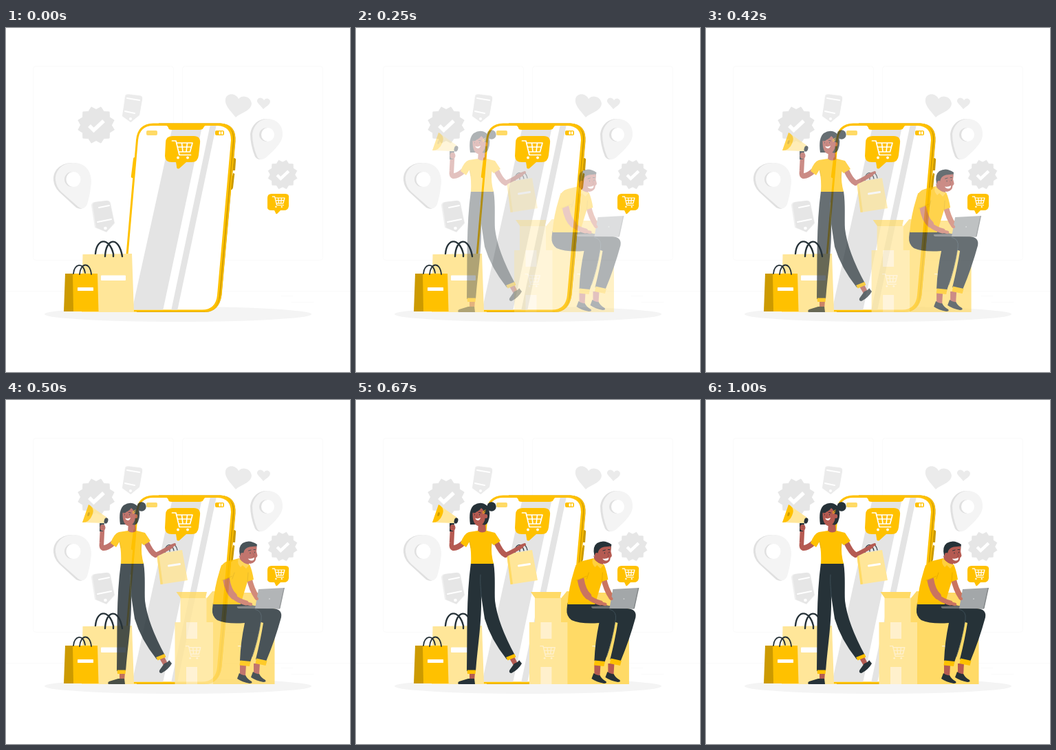
An HTML page with a canvas for the animation above (1040 ms loop, 500x500 px).

```html
<!DOCTYPE html>
<html lang="en">
<head>
<meta charset="utf-8">
<title>Online shopping</title>
<style>
html, body { margin: 0; width: 100%; height: 100%; overflow: hidden; background: #fff; }
canvas { display: block; width: 500px; height: 500px; }
</style>
</head>
<body>
<canvas id="stage" width="500" height="500"></canvas>
<script>
const SIZE = 500, LOOP = 1040, STEP = 1000 / 24, TRAVEL = 30;
const YELLOW = '#ffc100', DEEP = '#cc9a00', PALE = '#ffe699', MID = '#ffda66', TAPE = '#fff0cc';
const DARK = '#263238', SKIN = '#b55b52', TAN = '#ca7460', SHADE = '#9c453f';
const GREY = '#e6e6e6', SILVER = '#ebebeb', MIST = '#f4f4f4';

const stage = document.getElementById('stage').getContext('2d');
const newLayer = () => {
  const c = document.createElement('canvas');
  c.width = c.height = SIZE;
  return c.getContext('2d');
};
let g;

const fill = (color, d) => { g.fillStyle = color; g.fill(new Path2D(d)); };
const line = (color, width, d) => {
  g.strokeStyle = color;
  g.lineWidth = width;
  g.lineCap = g.lineJoin = 'round';
  g.stroke(new Path2D(d));
};
const oval = (color, x, y, rx, ry = rx, turn = 0) => {
  g.fillStyle = color;
  g.beginPath();
  g.ellipse(x, y, rx, ry, turn, 0, Math.PI * 2);
  g.fill();
};
const box = (color, x, y, w, h, r = 0) => {
  g.fillStyle = color;
  g.beginPath();
  g.roundRect(x, y, w, h, r);
  g.fill();
};

// Cart icon, about 30 units wide, centred on x, y
function cart(x, y, scale, color, width = 1.7) {
  g.save();
  g.translate(x, y);
  g.scale(scale, scale);
  line(color, width, 'M-14.5 -13H-9L-4 7.5H12.5M-7.5 -10H15L11.5 3H-5M-6.5 -4H13.5M-.5 -10L1 3M7.5 -10L6 3');
  oval(color, -6, 11.5, 1.9);
  oval(color, 8, 11.5, 1.9);
  g.restore();
}

function badge(x, y, r) {
  g.save();
  g.translate(x, y);
  g.scale(r / 27, r / 27);
  g.beginPath();
  for (let i = 0; i < 24; i++) {
    const a = (i + 1) * Math.PI / 12, d = i % 2 ? 22.5 : 27;
    g.lineTo(Math.cos(a) * d, Math.sin(a) * d);
  }
  g.closePath();
  g.fillStyle = g.strokeStyle = GREY;
  g.lineWidth = 1;
  g.lineJoin = 'round';
  g.fill();
  g.stroke();
  g.strokeStyle = '#fff';
  g.lineWidth = 5.5;
  g.lineCap = 'butt';
  g.lineJoin = 'miter';
  g.stroke(new Path2D('M-10 1L-3.5 7.5L11 -6'));
  g.restore();
}

function scenery() {
  g.strokeStyle = '#fafafa';
  g.lineWidth = 1;
  for (const x of [39.5, 256.5]) {
    g.beginPath();
    g.roundRect(x, 55.5, 204, 282, 4);
    g.stroke();
  }
  line('#fafafa', 1, 'M0 382.5H500M400 389.5H417M415 398.5H447');
  oval('#f4f4f4', 250, 416, 194, 11);

  badge(131, 141, 27);
  badge(402, 213, 21.5);

  fill('#f2f2f2', 'M173 98Q174 96 178 96L194 98Q199 99 198 104L194 127L181 137L169 128Z');
  fill(SILVER, 'M174 98Q175 97 179 97L195 98.5Q199 99 198 104L194 126L181.5 137L169 128Z');
  line('#fff', 2, 'M176 102L194 105M173 121L187 124');
  oval('#fff', 181, 132, 2);
  fill('#f0f0f0', 'M124 258Q124 254 128 253L145 251Q150 250 152 254L158 284L146 297L129 290Z');
  fill(GREY, 'M126 258Q126 254 130 253L146 251Q150 251 151 254L157.5 283L146 296.5L131 290Z');
  line('#fff', 2, 'M135 261L150 258M133 282L153 278');
  oval('#fff', 144.5, 291, 2.3);

  fill('#e0e0e0', 'M69 221C68 207 79 197 94 196C110 195 121 206 121 223L116 257Q111 266 102 261L77 238Q70 231 69 221Z');
  fill(MIST, 'M72 221C71 207 82 196 97 196C113 195 124 206 124 223C123 236 121 246 118 256Q113 266 105 260L80 238Q73 231 72 221Z');
  oval('#e0e0e0', 96, 220, 11);
  oval('#fff', 98, 220, 10.5, 11);
  fill('#e0e0e0', 'M355 154C357 140 367 132 379 132C392 133 401 143 400 156C399 166 392 172 387 178L375 189Q367 194 362 187Q355 170 355 154Z');
  fill(MIST, 'M358 154C360 140 370 132 381 132C395 133 403 143 402 156C401 166 394 172 389 178L377 189Q369 194 365 187Q358 170 358 154Z');
  oval('#e0e0e0', 378, 155, 10);
  oval('#fff', 380.5, 155, 9.5, 10);

  fill(SILVER, 'M334 130C328 122 317 113 319 103C321 94 334 94 338 103C344 96 356 100 357 110C356 121 341 123 334 130Z');
  fill(SILVER, 'M374 118C371 113 364 109 365 105C367 100 373 101 375 105C378 100 384 103 384 107C383 113 377 114 374 118Z');
}

function phone() {
  fill(DEEP, 'M331 189Q335 189 334 193L333 207H329ZM330 211Q333 211 332 214L330 232Q329 236 325 235Z');
  fill(YELLOW, 'M187 188H190L187 218H184Q181 218 182 214L185 190Q185 188 187 188Z');
  fill(DEEP, 'M222 138.5H312Q335 140 333.5 165L313.5 388Q310 412 290 413H190V409Z');
  line(YELLOW, 1.6, 'M310 139.3Q334 140 332.3 165L312.5 388Q309 411 290 412');
  fill(YELLOW, 'M214 138.5H308Q331 139 330 163L310 389Q308 412.5 286 412.5H181Q168 412 169 393L189 163Q191 139 214 138.5Z');
  const screen = 'M214 142H308Q327 143 327 163L307 388Q305 409.5 285 409.5H183Q171 409 172 393L192 163Q194 142 214 142Z';
  fill('#fff', screen);
  g.save();
  g.clip(new Path2D(screen));
  fill('#e4e4e4', 'M183 411L241 148H284L228 411ZM240 411L297 140H306L249 411Z');
  g.restore();
  fill(YELLOW, 'M231 141H292Q288 142 287 145Q286 148 281 148H241Q236 148 236 145Q235 142 231 141Z');
  box(MID, 204, 149, 16, 7, 2);
  box(YELLOW, 304, 149, 13, 7, 2);
  box('#fff', 309.5, 150.3, 2.4, 4.4);
  box('#fff', 313, 150.3, 2.4, 4.4);

  fill(YELLOW, 'M242 157H273Q283 157 282 167L280 185Q279 195 270 195H262L252 204Q248 206 248 201L247 195H241Q231 195 231 186L232 167Q232 157 242 157Z');
  cart(256, 177, 1, '#fff');
  fill(YELLOW, 'M386 241H406Q412 241 411 247L411 259Q410 265 404 265H399L394 270Q392 271 392 269L390 265H386Q379 265 380 259V247Q380 241 386 241Z');
  cart(396, 253, 0.6, '#fff', 2);
}

function bags() {
  fill(PALE, 'M111.5 329L183 328L186 413H110Z');
  line(DARK, 2.4, 'M130 328C132 305 150 304 156 328L156 332M144 332C145 305 164 302 169 332');
  box('#fff', 138, 359.5, 36, 7.5, 1);
  fill(DEEP, 'M86 357H98L99 412H84Z');
  fill(YELLOW, 'M97 357H133L134.5 412H98Z');
  line(DARK, 1.8, 'M98 357C99 342 113 340 115 356M107 358C108 341 122 339 124 358');
  box('#fff', 104, 377, 23, 5, 0.5);
}

function woman() {
  // Carried bag
  line(DARK, 1.2, 'M231 222C230 210 241 205 244 219M238 220C237 207 247 207 249 218');
  fill(PALE, 'M219 224L256 218L264 262L225 268Z');
  fill(MID, 'M219 224L222 223.5L228 267.5L224.5 268Z');
  line('#fff', 3, 'M236.5 241L252.5 238.5');

  // Legs and shoes
  fill(SKIN, 'M165 396H173L172 408H165ZM222 374L229 371L235 383L229 386Z');
  fill(DARK, 'M172 405L173 413H149Q147 411 150 409L163 405ZM230 383Q236 381 237 378L241 383Q236 392 226 397Q222 397 223 393Z');
  fill(DARK, 'M167 237H200C203 257 201 278 202 292Q206 325 231 371L219 377Q196 348 187 318L182 285C183 322 177 355 174 394H161C162 341 160 287 167 237Z');
  line('#455a64', 0.7, 'M181 254C180 268 182 275 182 287');
  fill(YELLOW, 'M161.5 392.5H174L173.5 398H162ZM218 374L230.5 369L232.5 373.5L220.5 378.5Z');

  // Megaphone and raised arm
  line(SKIN, 8, 'M157 207Q148 215 142 215');
  line(SKIN, 6.5, 'M142 215Q138 216 139 208L140 188');
  fill(PALE, 'M120 152L147 171L144 179L111 178Z');
  fill(YELLOW, 'M120 152Q130 157 125 168Q121 178 111 178Z');
  oval(DEEP, 120, 166, 1.5, 3, 0.35);
  oval(DARK, 145.5, 175.5, 2.8, 4.2, 0.3);
  fill(DARK, 'M136 179H143L141 191H136Z');
  oval(SKIN, 140.5, 185.5, 4, 4.5);
  line(SHADE, 0.6, 'M138 184H143M138 187H143');

  // Other arm
  line(SKIN, 8, 'M204 207Q211 222 217 225');
  line(SKIN, 6, 'M217 225Q227 221 240 213');
  line(SKIN, 4, 'M237 214L245 210');

  // Shirt
  fill(SKIN, 'M178 178H188L189 193Q183 199 177 192Z');
  fill(YELLOW, 'M177 190Q183 195 190 190L202 193L210 205L200 211L197 208Q196 224 200 238H167Q168 221 165 206L160 214L152 208Q157 194 164 192Z');
  line('#e0a900', 0.8, 'M165 206L167 215M197 208L196 218');

  // Head
  oval(DARK, 197, 155, 6.7);
  fill(DARK, 'M166 181Q163 160 171 153Q182 146 191 154Q197 164 192 177Q189 183 184 181Z');
  fill(SKIN, 'M169.5 164Q178 163 182 157Q188 161 188 170Q187 181 179 183.5Q169 182 169.5 164Z');
  oval(SKIN, 189, 169, 2.2, 3);
  fill('#fff', 'M173 171.5Q177 173.5 181 171Q180 175 177 175Q174 174.5 173 171.5Z');
  line(DARK, 1, 'M172.5 166.5V167M179.5 166.5V167M171 164L173.5 163.5M178.5 163.5L181.5 164');
  line(SHADE, 0.8, 'M176 166.5L174.5 170H176.5');
  line(YELLOW, 1, 'M184 163L188 160M184.5 165L188 162.5');
}

function crates() {
  fill(MID, 'M306 280H396.5V413H304ZM297 289L306 278H314V323H297Z');
  fill(PALE, 'M259.5 287H297.5V323H259.5Z');
  fill(MID, 'M253.5 279H298L296 288H260Z');
  fill(PALE, 'M251.5 323H307V413H251.5Z');
  fill(TAPE, 'M268 323H284V347H268ZM268 388H284V413H268Z');
  cart(278, 367, 0.72, TAPE, 2);
  cart(354, 367, 0.72, TAPE, 2);
}

function shoe(x, y) {
  fill(SKIN, `M${x + 4} ${y - 14}H${x + 13}L${x + 12} ${y + 3}H${x + 4}Z`);
  fill(DARK, `M${x + 3} ${y - 2}Q${x + 8} ${y + 2} ${x + 12} ${y + 1}Q${x + 15} ${y + 7} ${x + 21} ${y + 10}Q${x + 23} ${y + 13} ${x + 18} ${y + 13}Q${x + 7} ${y + 11} ${x} ${y + 6}Z`);
}

function man() {
  shoe(362, 397);
  shoe(342, 399);
  fill(DARK, 'M347 296L394 303Q408 304 406 316Q397 349 384 380L369 377Q376 349 380 324L350 314Z');
  fill(YELLOW, 'M370 375.5L385.5 379L383.5 386L368.5 383Z');
  fill(DARK, 'M307 295H352L368 304Q379 307 377 319Q372 351 361 381L346 379Q347 352 353 324Q327 326 313 320Q305 314 306 304Z');
  line('#455a64', 0.7, 'M368 304Q379 307 377 319Q372 351 364 373');
  fill(YELLOW, 'M346.5 378.5L361.5 380L360 387L345.5 385.5Z');

  // Far arm and torso
  line(TAN, 8, 'M359 257Q363 276 371 287');
  fill(SKIN, 'M345 226L359 234V243L347 239Z');
  fill(YELLOW, 'M329 234L345 230Q352 240 360 239Q364 248 366 261L357 264Q352 280 347 297H307Q309 272 316 250Q319 236 329 234Z');
  line('#e0a900', 0.8, 'M357 264L358 251M335 260L338 251');
  fill('#ffcf3d', 'M344 230Q352 239 360 239L355 245L350 240L347 243Q341 237 344 230Z');

  // Laptop and near arm
  fill('#6d7173', 'M342 300L370 299L404 302V303.5L344 303Q341 302 342 300Z');
  fill('#a3a7a9', 'M373 275L410.5 273L404 303H368Z');
  fill('#85898b', 'M409.5 273H411L404.5 303H403Z');
  oval('#c9cccd', 389, 289, 0.9);
  line(TAN, 10, 'M326 260Q329 278 337 285');
  line(TAN, 7, 'M337 286Q344 292 355 295');
  line(TAN, 4.5, 'M353 295L362 297');
  line(TAN, 4, 'M369 287L371 289');
  fill(YELLOW, 'M319 240Q333 240 336 256L319 263L315 257Z');
  line('#e0a900', 0.7, 'M320 262L335 256');

  // Head
  fill(DARK, 'M346 226Q343 213 350 208Q360 202 371 210L370 216L353 219L351 230Z');
  fill(SKIN, 'M351 223Q352 215 360 213.5L370 212.5Q371 216 370 220L371.5 226Q371 229 369.5 229Q369 237 361 238Q352 237 350 229Z');
  oval(SKIN, 349.5, 226, 2.8, 4);
  fill('#fff', 'M358 230.5Q363 231.5 367 229Q367 233.5 363 233.5Q359 233 358 230.5Z');
  line(DARK, 1, 'M361 222V223M367.5 221V222M358.5 219L362 218M366 217.5L368.5 217.5');
  line(SHADE, 0.8, 'M365 222L367 227L365 227.5');
}

// Cubic curve with control points (.36, -.01) and (.5, 1.38)
function ease(x) {
  const cubic = (a, b, s) => 3 * a * s * (1 - s) ** 2 + 3 * b * s * s * (1 - s) + s ** 3;
  let lo = 0, hi = 1;
  for (let i = 0; i < 24; i++) {
    const mid = (lo + hi) / 2;
    if (cubic(0.36, 0.5, mid) < x) lo = mid; else hi = mid;
  }
  return x >= 1 ? 1 : cubic(-0.01, 1.38, lo);
}

const base = newLayer(), lady = newLayer(), group = newLayer();
g = base;
g.fillStyle = '#fff';
g.fillRect(0, 0, SIZE, SIZE);
scenery();
phone();
bags();
g = lady;
woman();

function render(now) {
  const tick = Math.min(24, Math.floor((now % LOOP + 5) / STEP));
  const pos = tick ? ease(Math.min(1, tick / 24 + 0.03)) : 0;

  g = group;
  g.clearRect(0, 0, SIZE, SIZE);
  g.save();
  g.translate((pos - 1) * TRAVEL, 0);
  crates();
  man();
  g.restore();

  stage.globalAlpha = 1;
  stage.drawImage(base.canvas, 0, 0);
  stage.globalAlpha = Math.min(1, Math.max(0, pos) ** 0.8);
  stage.drawImage(group.canvas, 0, 0);
  stage.drawImage(lady.canvas, 0, 0);
}

const start = performance.now();
function loop() {
  render(performance.now() - start);
  requestAnimationFrame(loop);
}
loop();
</script>
</body>
</html>
```
